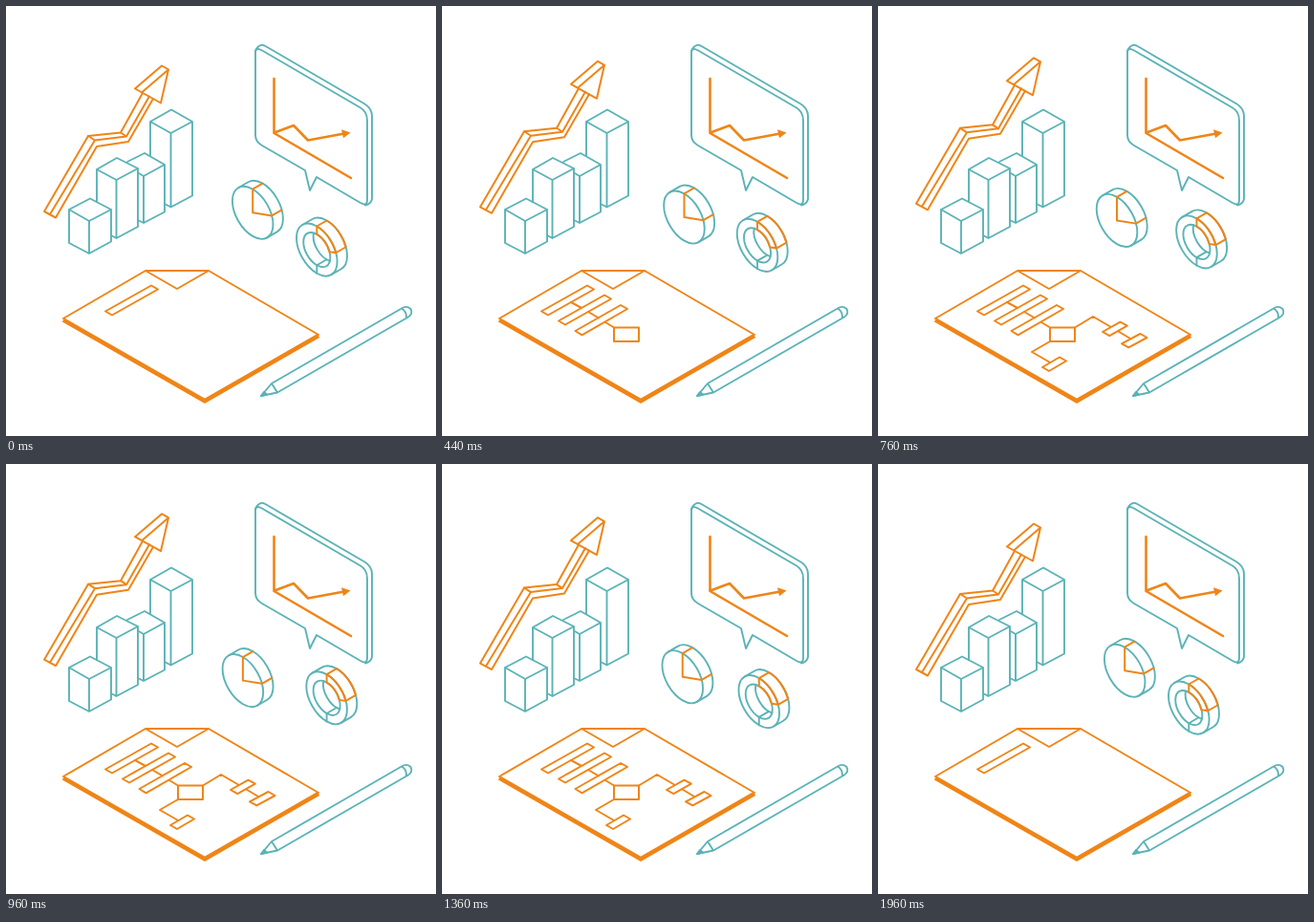
An HTML page for the animation above (2000 ms loop, 450 px wide and 450 px high).

```html
<!DOCTYPE html>
<html lang="en">
<head>
<meta charset="utf-8">
<title>Isometric charts</title>
<style>
  html, body { margin: 0; width: 100%; height: 100%; overflow: hidden; background: #fff; }
  svg { display: block; width: 100%; height: 100%; }
  path, circle { vector-effect: non-scaling-stroke; }
  g { fill: none; stroke-width: 1.9; stroke-linejoin: round; stroke-linecap: round; }
  .teal { stroke: #5bb3b6; }
  .orange { stroke: #ef8517; stroke-width: 2; }
  .chart { stroke-width: 2.6; }
</style>
</head>
<body>
<svg viewBox="0 0 450 450">
  <!-- bar chart -->
  <g class="teal">
    <path d="M66 213L88 201.500L110 213L87 225ZV248L87 259L110 246.500V213M87 225V259"/>
    <path d="M95 205V171L116 159L138 170L115.500 182L95 171M115.500 182V243M110 240L115.500 243L138 231V170"/>
    <path d="M127 163L145 154L166 166L144 178L138 174.500M144 178V227M138 224L144 227L166 215.500V166"/>
    <path d="M151 157V121L173 108.500L195 121L172.500 133L151 121M172.500 133V210.500M166 207L172.500 210.500L195 198.500V121"/>
  </g>

  <g id="arrow" class="orange">
    <path d="M143 91L120 132.500L86 136L40 215L52 221.500L95 147L128 142L154 97"/>
    <path d="M46 218L93 140.500L126 136.500L150 94.500M86 136L93 140.500M120 132.500L126 136.500"/>
    <path d="M142 90.500L170 66.500L162 101.500L135 86.500L163 62.500L170 66.500"/>
  </g>

  <!-- speech bubble -->
  <g class="teal">
    <path d="M261 49Q261 42.500 268 46.500L371 106.500Q378 110.500 378 120V203Q378 210 371 206L325 179L318 193L313 172L268 146Q261 142 261 135Z"/>
    <path d="M261 47Q263 42 267 40.800Q269 40.300 272 42.300L375 102.300Q383 107 383 115V202Q382 207 376 208.500"/>
  </g>
  <g class="orange chart">
    <path d="M280.500 76V133L361 180M281 132.500L301 125L316 140.500L354 133.500"/>
    <path d="M351 129.300L360.500 132.400L353 138.300Z" fill="#ef8517" stroke="none"/>
  </g>

  <!-- discs are drawn flat and skewed into the isometric plane -->
  <g id="pie">
    <g transform="matrix(.866 .5 0 1 258.200 216.300)">
      <g class="teal"><circle r="24.600"/><path d="M-17.400-17.400l12-12A24.600 24.600 0 0 1 29.400 5.400l-12 12"/></g>
      <g class="orange"><path d="M12-36.600L0-24.600V0L23.100-8.400l12-12"/></g>
    </g>
  </g>
  <g id="ring">
    <g transform="matrix(.866 .5 0 1 325.300 255.100)">
      <g class="teal">
        <circle r="24.600"/><circle r="16.200"/>
        <path d="M-17.400-17.400l12-12A24.600 24.600 0 0 1 29.400 5.400l-12 12"/>
        <path d="M-3.800-15.800A16.200 16.200 0 0 0 15.800 3.800M0 24.600V16.200l12-12"/>
      </g>
      <g class="orange">
        <path d="M0-24.600l12-12A24.600 24.600 0 0 1 35.100-20.400l-12 12A24.600 24.600 0 0 0 0-24.600V-16.200A16.200 16.200 0 0 1 15.200-5.500L23.100-8.400"/>
      </g>
    </g>
  </g>

  <!-- paper -->
  <g class="orange">
    <path d="M60 327L146 277H212L327 344M146 277L179 296L212 277"/>
    <path d="M60 328.500L208 413.300L327 345" style="stroke-width:4.600;stroke-linecap:butt;stroke-linejoin:miter"/>
    <path d="M104 319.500L152 292.500L159 296.500L111 323.500Z"/>
  </g>
  <g id="diagram" class="orange">
    <path d="M122 329.500L170 302.500L177 306.500L129 333.500ZM135 310L146 316"/>
    <path d="M139.500 340L187 313L194 317L146.500 344.300ZM153 320L164 326.500"/>
    <path d="M180 336.500H206V351H180ZM171 331L180 336.500"/>
    <path d="M180 351L161 362L180 373M172 378L190 367.500L197 371.500L179 382Z"/>
    <path d="M206 336.500L225 325L243 335.500M235 341L253.500 330.700L260.800 334.700L242.300 345.200ZM251.500 340.500L264 348M255 353.300L274.500 343L281.500 347L262.300 357.300Z"/>
  </g>

  <!-- pencil -->
  <g class="teal">
    <path d="M278 395L414 316.500Q419 313 423.500 317Q426 322 421 325.500L284 404.500L267 408ZL284 404.500M414 316.500Q419 319 419 326"/>
    <path d="M267 408L270 404L273 406.500Z" fill="#5bb3b6"/>
  </g>
</svg>
<script>
  const STEP = 40, STEPS = 50, SPEED = 0.43, REVEAL = 3;
  const get = id => document.getElementById(id);
  const move = (id, x, y) => get(id).setAttribute('transform', `translate(${x} ${y})`);
  const parts = [...get('diagram').children];

  function draw(now) {
    const i = Math.floor(now / STEP) % STEPS;
    const k = Math.min(i, STEPS - 1 - i); // forth and back
    const d = k * SPEED;
    move('arrow', 0, -d);
    move('pie', -d, d);
    move('ring', d, -d);
    parts.forEach((part, n) => {
      part.style.display = k >= (n + 1) * REVEAL ? '' : 'none';
    });
  }

  const start = performance.now();
  function loop() {
    draw(performance.now() - start);
    requestAnimationFrame(loop);
  }
  loop();
</script>
</body>
</html>
```
